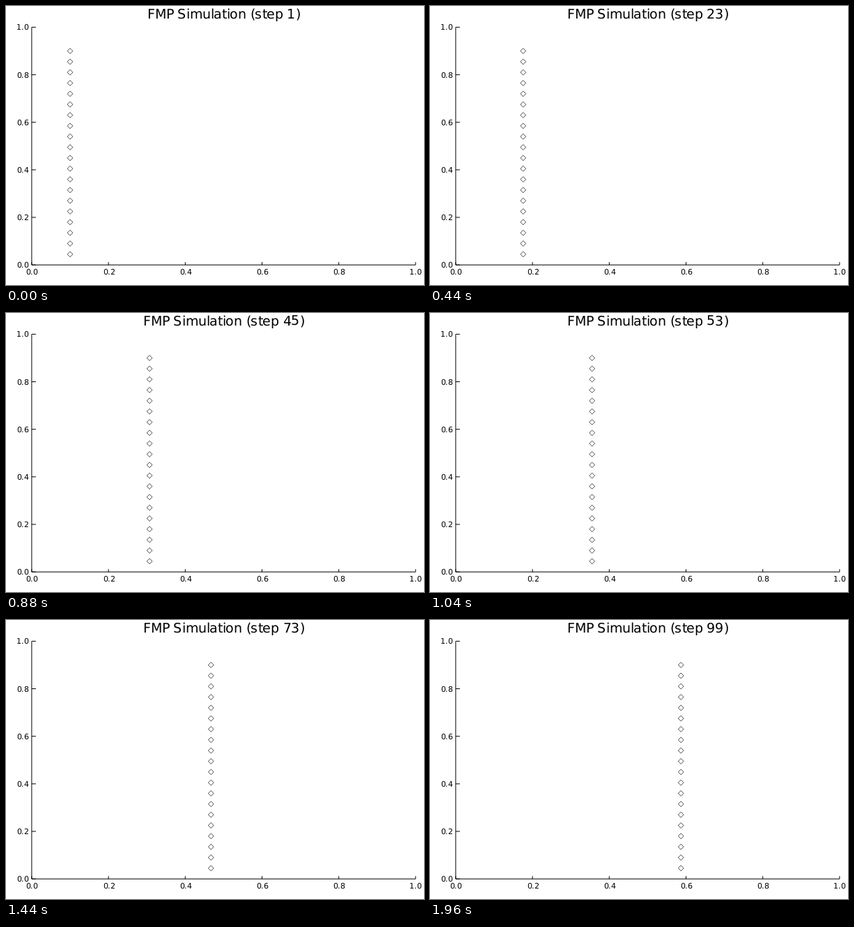
Animation, 600 px wide and 400 px high, one loop 2 s. Source, as a matplotlib script:

```python
import numpy as np
import matplotlib.pyplot as plt
from matplotlib.animation import FuncAnimation
from matplotlib.collections import PolyCollection
from matplotlib.textpath import TextPath

W, H, DPI = 600, 400, 100
FRAMES, INTERVAL = 50, 40
LEFT, RIGHT, TOP, BOTTOM = 36.9, 587.9, 30.4, 371.2
PT = 72 / DPI  # points per pixel
TITLE_SIZE, TICK_SIZE = 19.5, 11.14

plt.rcParams["font.family"] = "DejaVu Sans"
plt.rcParams["text.hinting"] = "none"
plt.rcParams["text.hinting_factor"] = 1


def px(x):
    return LEFT + x * (RIGHT - LEFT)


def py(y):
    return BOTTOM - y * (BOTTOM - TOP)


def front(step):
    """Shared x position: spin-up to a slowly fading speed."""
    t, tau = step - 1, 16.5
    return 0.1 + 0.00892 * (t - tau * (1 - np.exp(-t / tau))) - 2.505e-5 * t**2


fig = plt.figure(figsize=(W / DPI, H / DPI), dpi=DPI, facecolor="white")
ax = fig.add_axes([0, 0, 1, 1])
ax.set_xlim(0, W)
ax.set_ylim(H, 0)
ax.axis("off")


def ink_width(s):
    return TextPath((0, 0), s, size=100).get_extents().width / 100


ADVANCE = {c: ink_width(f"|{c}|") - ink_width("||")
           for c in set("FMP Simulation (step)0123456789.")}


def pen_stops(s, size):
    """Glyph offsets with each advance cut to whole pixels, and the total."""
    stops = np.cumsum([0] + [int(ADVANCE[c] * size) for c in s])
    return stops[:-1], stops[-1]


def write(s, x, y, size, align):
    """Draw text glyph by glyph; align is 0.5 for centred, 1 for right."""
    stops, width = pen_stops(s, size)
    start = round(x - align * width)
    return [ax.text(start + dx, y, c, size=size * PT, ha="left", va="baseline")
            for c, dx in zip(s, stops) if c != " "]


def line(xs, ys):
    ax.plot(xs, ys, color="black", lw=PT, solid_capstyle="butt", snap=False)


line([LEFT, RIGHT], [BOTTOM, BOTTOM])
line([LEFT, LEFT], [BOTTOM, TOP])
for v in np.linspace(0, 1, 6):
    line([px(v), px(v)], [BOTTOM, BOTTOM - 4])
    line([LEFT, LEFT + 6], [py(v), py(v)])
    label = f"{v:.1f}"
    write(label, px(v), 385, TICK_SIZE, 0.5)
    write(label, 32, round(py(v)) + 4, TICK_SIZE, 1)

rows = py(0.045 * np.arange(1, 21))
diamond = 3.9 * np.array([(-1, 0), (0, -1), (1, 0), (0, 1)])
dots = PolyCollection([], facecolors="white", edgecolors="black",
                      linewidths=0.5 * PT, snap=False)
ax.add_collection(dots, autolim=False)
title = []


def update(i):
    step = 2 * i + 1
    while title:
        title.pop().remove()
    title.extend(write(f"FMP Simulation (step {step})",
                       (LEFT + RIGHT) / 2, 18, TITLE_SIZE, 0.5))
    x = px(front(step))
    dots.set_verts([diamond + (x, y) for y in rows])
    return [dots, *title]


anim = FuncAnimation(fig, update, frames=FRAMES, interval=INTERVAL,
                     repeat=True, repeat_delay=0)
plt.show()
```
